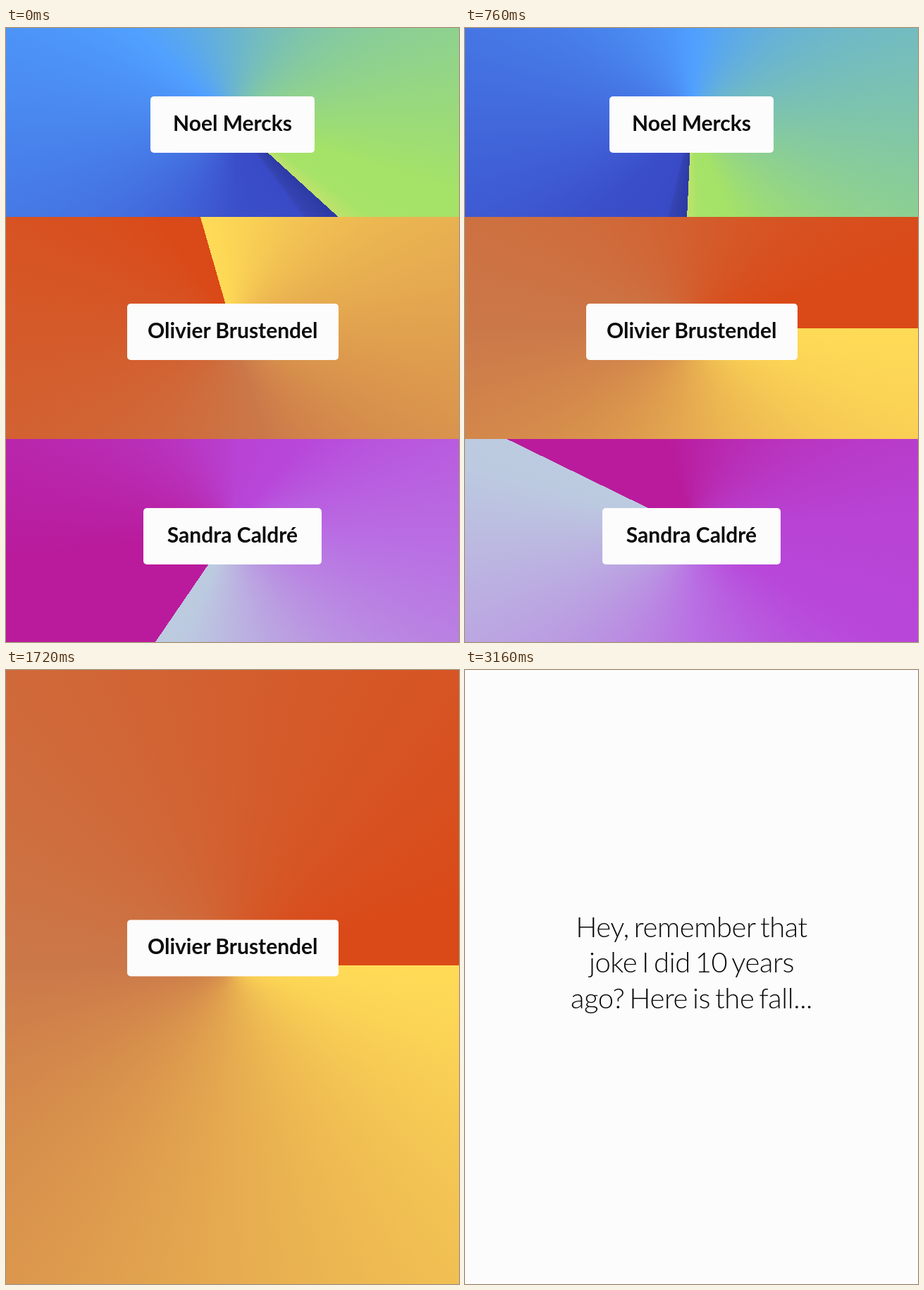
An HTML page for the animation above (3.84 s loop, 643 by 871 pixels).

```html
<!DOCTYPE html>
<html lang="en">
<head>
<meta charset="utf-8">
<style>
html, body { margin: 0; width: 100%; height: 100%; overflow: hidden; background: #fcfcfc; }
#stage { position: relative; width: 643px; height: 871px; overflow: hidden; font-family: Lato, sans-serif; }
#stage > div { position: absolute; }
.panel { left: 0; width: 643px; }
.label {
  height: 80px; line-height: 74px; border-radius: 5px; background: #fcfcfc;
  color: #0c0c0c; font-size: 30px; font-weight: 700; text-align: center; white-space: nowrap;
}
#sheet { left: 0; top: 0; width: 643px; background: #fcfcfc; }
#touch { left: 313px; top: 431px; width: 0; height: 0; border-radius: 50%; background: #fff; transform: translate(-50%, -50%); }
#story {
  left: 0; top: 339px; width: 643px; color: #0c0c0c;
  font-size: 40px; font-weight: 300; line-height: 50.4px; letter-spacing: -.4px; word-spacing: -3.5px;
  text-align: center; white-space: nowrap;
}
</style>
</head>
<body>
<div id="stage">
  <div class="panel" id="blue"></div>
  <div class="panel" id="pink"></div>
  <div class="label" style="left:205px;top:97px;width:233px">Noel Mercks</div>
  <div class="label" style="left:195px;top:681px;width:253px">Sandra Caldré</div>
  <div class="panel" id="gold"></div>
  <div id="sheet"></div>
  <div class="label" id="chosen" style="left:172px;top:391px;width:299.5px">Olivier Brustendel</div>
  <div id="touch"></div>
  <div id="story">Hey, remember that<br>joke I did 10 years<br>ago? Here is the fall...</div>
</div>
<script>
const LOOP = 3840, STEP = 40, HEIGHT = 871;
const COLORS = {
  blue: '#2c3aa4 0deg, #3644b4 10deg, #394ac6 12deg, #3b4fcb 45deg, #50a0ff 180deg, #a4e268 335deg, #a6e368 352deg, #bfe26c 360deg',
  gold: '#ffdb57 0deg, #fbd355 20deg, #cb7849 180deg, #da4918 345deg, #da4918 360deg',
  pink: '#b91b9c 0deg, #b91b9c 48deg, #b843d4 150deg, #b847da 185deg, #b96ee3 240deg, #bccae0 350deg, #bccbe0 360deg'
};
const el = id => document.getElementById(id);
const mix = (a, b, p) => a + (b - a) * p;
const progress = (t, start, length) => Math.min(1, Math.max(0, (t - start) / length));
const easeOut = (t, start, length) => 1 - (1 - progress(t, start, length)) ** 2;

const SPIN = [[0, -16.1], [320, 35.5], [760, 90], [1200, 73.9], [1720, 90], [LOOP, 90]];
function goldAngle(t) {
  const i = SPIN.findIndex(key => key[0] > t);
  const [t0, a] = SPIN[i - 1], [t1, b] = SPIN[i];
  return mix(a, b, (t - t0) / (t1 - t0));
}

function panel(id, top, bottom, centre, angle) {
  const s = el(id).style;
  s.top = top + 'px';
  s.height = bottom - top + 'px';
  s.background = `conic-gradient(from ${angle}deg at 321.5px ${centre - top}px, ${COLORS[id]})`;
}

function draw(t) {
  const open = easeOut(t, 840, 394);
  const top = mix(268, 0, open);
  const bottom = mix(583, HEIGHT, easeOut(t, 840, 523));
  panel('blue', 0, top, top * 0.49, 132.3 + t * 0.0663);
  panel('gold', top, bottom, mix(426, 419, open), goldAngle(t));
  panel('pink', bottom, HEIGHT, (bottom + 839) / 2, 214.4 + t * 0.1074);

  const touch = progress(t, 1000, 400);
  const size = 130 * easeOut(t, 1000, 400) + 'px';
  Object.assign(el('touch').style, { width: size, height: size, opacity: 1 - touch });

  el('chosen').style.transform = `translateY(${-487 * easeOut(t, 1697, 600)}px)`;
  el('sheet').style.height = HEIGHT * easeOut(t, 1773, 613) + 'px';
  el('story').style.opacity = easeOut(t, 2390, 770);
}

const begin = performance.now();
function tick() {
  const t = (performance.now() - begin) % LOOP;
  draw(Math.floor(t / STEP) * STEP);
  requestAnimationFrame(tick);
}
tick();
</script>
</body>
</html>
```
